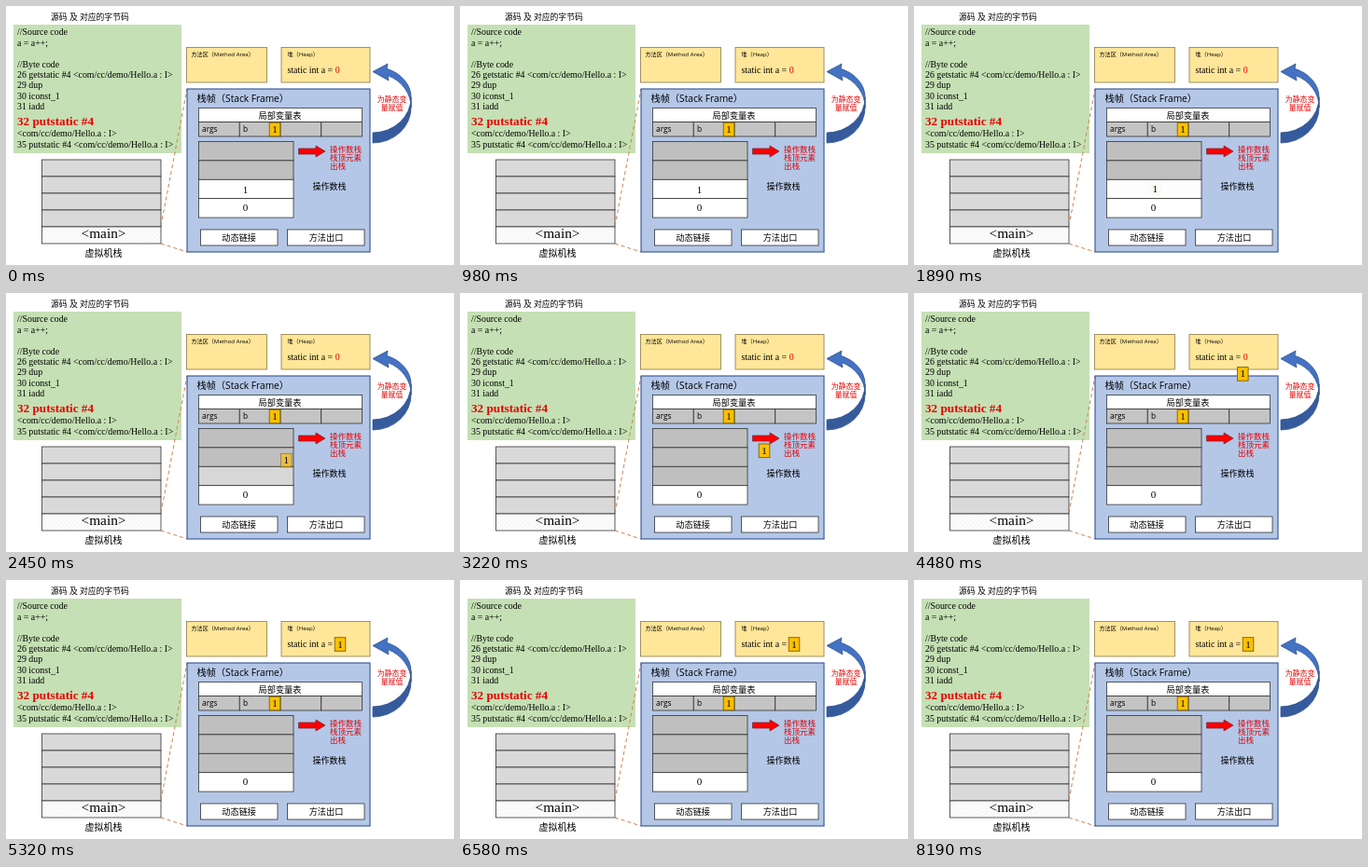
An HTML page that plays this animation: 480 by 278 pixels, repeating every 8540 ms.

```html
<!DOCTYPE html>
<html lang="zh">
<head>
<meta charset="utf-8">
<style>
  html, body { margin: 0; width: 100%; height: 100%; overflow: hidden; background: #fff; }
  svg { display: block; width: 480px; height: 278px; }
  text { font-family: "Open Sans", "Noto Sans CJK SC", "Noto Sans CJK", sans-serif; white-space: pre; }
  .serif { font-family: "Liberation Serif", serif; }
  .mid { text-anchor: middle; }
  .red { fill: #e60000; }
</style>
</head>
<body>
<svg id="stage" viewBox="0 0 480 278">
  <defs>
    <pattern id="hatch" width="3" height="3" patternUnits="userSpaceOnUse" patternTransform="rotate(45)">
      <rect width="3" height="3" fill="#fff"/>
      <path d="M0 0V3" stroke="#e4e4e4"/>
    </pattern>
  </defs>
</svg>
<script>
const LOOP = 8540;
const stage = document.getElementById('stage');

function add(tag, attrs, parent = stage) {
  const node = document.createElementNS('http://www.w3.org/2000/svg', tag);
  for (const key in attrs) node.setAttribute(key, attrs[key]);
  return parent.appendChild(node);
}
const box = (x, y, right, bottom, fill, stroke = '#333', width = 0.8) =>
  add('rect', { x, y, width: right - x, height: bottom - y, fill, stroke, 'stroke-width': width });
const path = (d, fill, stroke, extra = {}) =>
  add('path', { d, fill, stroke, 'stroke-width': 0.8, ...extra });
function label(str, x, y, size, cls = '', parent = stage) {
  const node = add('text', { x, y, 'font-size': size, class: cls }, parent);
  node.textContent = str;
  return node;
}
function chip(x, y) {
  const group = add('g', { transform: `translate(${x} ${y})` });
  add('rect', { x: -5.8, y: -7.3, width: 11.6, height: 14.6, fill: '#ffc000', stroke: '#7f6000', 'stroke-width': 0.9 }, group);
  label('1', 0, 3.5, 11, 'serif mid', group);
  return group;
}

// Source and byte code
label('源码 及 对应的字节码', 48, 14.8, 8.8);
box(8, 20, 188, 158, '#c5e0b4', 'none');
[
  ['//Source code', 30.5], ['a = a++;', 43.3], ['//Byte code', 65.5],
  ['26 getstatic #4 <com/cc/demo/Hello.a : I>', 76.5], ['29 dup', 88],
  ['30 iconst_1', 100], ['31 iadd', 111],
  ['<com/cc/demo/Hello.a : I>', 139.5], ['35 putstatic #4 <com/cc/demo/Hello.a : I>', 151.5]
].forEach(([line, y]) => label(line, 12, y, 9.87, 'serif'));
label('32 putstatic #4', 12, 127.5, 13.2, 'serif red').setAttribute('font-weight', 'bold');

// Virtual machine stack
for (let i = 0; i < 5; i++)
  box(38.5, 165 + i * 18, 166, 183 + i * 18, i < 4 ? '#d9d9d9' : 'url(#hatch)');
label('<main>', 104.5, 248.7, 15.3, 'serif mid');
label('虚拟机栈', 104.5, 269.3, 10, 'mid');
path('M166 236L194 89M166 255L194 264', 'none', '#cf8050', { 'stroke-dasharray': '4 3', 'stroke-width': 1 });

// Method area and heap
box(193.5, 44.5, 279.5, 82, '#ffe699', '#8a7a45');
box(295, 44.5, 390, 82, '#ffe699', '#8a7a45');
label('方法区（Method Area）', 198.5, 53.8, 6.1);
label('堆（Heap）', 301.5, 53.8, 6.1);
label('static int a = ', 301.5, 72.3, 9.9, 'serif');
label('0', 352.8, 72.3, 9.9, 'serif red');

// Stack frame
box(194, 89, 390, 264, '#b4c7e7', '#2f528f', 1.1);
label('栈帧（Stack Frame）', 204.5, 103.2, 10.2);
box(206.5, 109.5, 381.5, 124.5, '#fff');
label('局部变量表', 293.5, 120.5, 9.2, 'mid');
for (let i = 0; i < 4; i++)
  box(206.5 + i * 43.75, 124.5, 250.25 + i * 43.75, 140, '#c4c4c4');
label('args', 210, 135, 8.4);
label('b', 254, 135, 8.4);
chip(288, 132.5);

const cells = [0, 1, 2, 3].map(i =>
  box(206.5, 145.5 + i * 20.4, 308, 165.9 + i * 20.4, i < 2 ? '#bfbfbf' : '#fff'));
label('0', 256.5, 219.7, 11, 'serif mid');
label('操作数栈', 328.5, 197, 9);
path('M313.5 153H332V150L342 156L332 162V159H313.5Z', '#f00', '#7a2a3a');
['操作数栈', '栈顶元素', '出栈'].forEach((line, i) => label(line, 347, 157 + i * 9.2, 8.5, 'red'));
box(208.5, 240, 291, 257, '#fff');
label('动态链接', 249.7, 252, 9.2, 'mid');
box(301.5, 240, 384, 257, '#fff');
label('方法出口', 343, 252, 9.2, 'mid');

// Assignment arrow: shaded tail, then the lit band with its head
path('M393 147A41 38 0 0 0 434 109V98A41 38 0 0 1 393 136Z', '#365b9d', '#2f528f');
path('M434 109V98A41 33 0 0 0 408 67.3L409 62L393 70.5L410 80L409 74.6A41 37 0 0 1 434 109Z', '#4472c4', '#2f528f');
label('为静态变', 413.5, 102.5, 7.9, 'mid red');
label('量赋值', 413.5, 112.3, 7.9, 'mid red');

const moving = chip(256, 197);
const movingFill = moving.firstChild;

function ease(t, start, end) {
  const u = Math.min(1, Math.max(0, (t - start) / (end - start)));
  return u < 0.5 ? 2 * u * u : 1 - 2 * (1 - u) ** 2;
}

function draw(now) {
  const t = now % LOOP;
  const out = ease(t, 1750, 2980);
  const assign = ease(t, 3850, 4750);
  const x = 256.5 + 69.5 * out + 32 * assign;
  const y = 197.3 - 28 * out - 100.3 * assign;
  const grey = 255 - 64 * out;
  moving.setAttribute('transform', `translate(${x} ${y})`);
  movingFill.setAttribute('opacity', out);
  cells[2].setAttribute('fill', `rgb(${grey},${grey},${grey})`);
  requestAnimationFrame(draw);
}
draw(performance.now());
</script>
</body>
</html>
```
